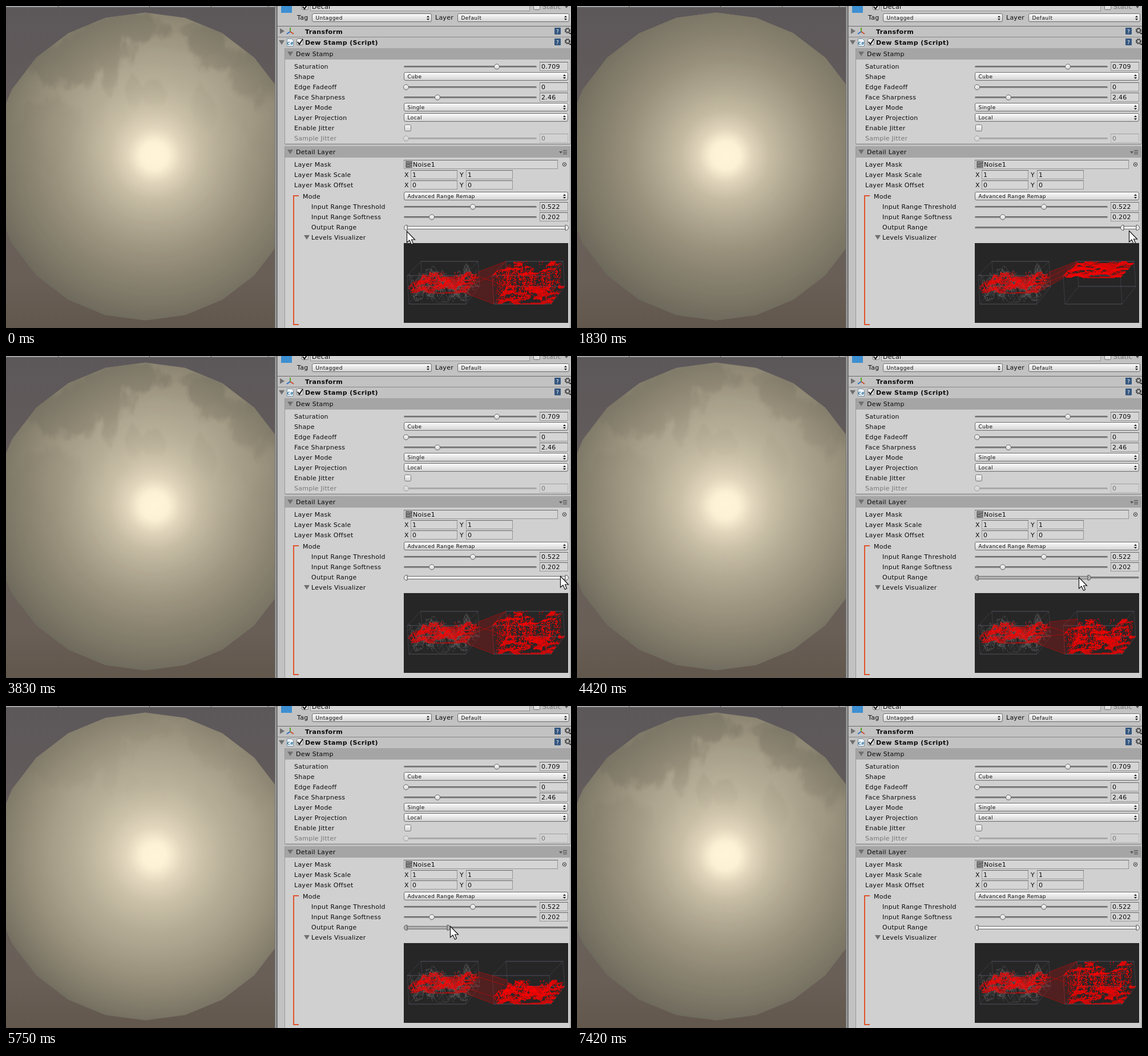
Animation, 990 px wide and 565 px high, one loop 8580 ms. Source, as an HTML page with a canvas:

```html
<!DOCTYPE html>
<html lang="en">
<head>
<meta charset="utf-8">
<title>Output range</title>
<style>
html, body { margin: 0; width: 990px; height: 565px; overflow: hidden; background: #c2c2c2; }
canvas, svg { position: absolute; left: 0; top: 0; display: block; }
text { font: 11px "DejaVu Sans", sans-serif; letter-spacing: .25px; fill: #0a0a0a; white-space: pre; }
.bold { font-weight: bold; letter-spacing: .38px; }
.small { font-size: 9px; letter-spacing: .42px; }
.help { fill: #fff; }
.dim { opacity: .45; }
</style>
</head>
<body>
<canvas id="scene" width="990" height="565"></canvas>
<svg id="ui" width="990" height="565" viewBox="0 0 990 565"></svg>
<script>
const LOOP = 8580, STEP = 1000 / 12;
const clamp = (v, a = 0, b = 1) => Math.min(b, Math.max(a, v));
const mix = (a, b, k) => a + (b - a) * k;
const smooth = (a, b, v) => { const k = clamp((v - a) / (b - a)); return k * k * (3 - 2 * k); };

// ---------- seeded noise ----------
function hash(x, y) {
  let n = Math.imul(x, 374761393) + Math.imul(y, 668265263) | 0;
  n = Math.imul(n ^ (n >>> 13), 1274126177);
  return ((n ^ (n >>> 16)) >>> 0) / 2 ** 32;
}
function valueNoise(x, y) {
  const i = Math.floor(x), j = Math.floor(y);
  const u = smooth(0, 1, x - i), v = smooth(0, 1, y - j);
  return mix(mix(hash(i, j), hash(i + 1, j), u), mix(hash(i, j + 1), hash(i + 1, j + 1), u), v);
}
function fbm(x, y, octaves) {
  let sum = 0, amp = 1, total = 0;
  for (let o = 0; o < octaves; o++, amp /= 2, x = x * 2 + 17, y = y * 2 + 31) {
    sum += amp * valueNoise(x, y);
    total += amp;
  }
  return sum / total;
}

// ---------- inspector ----------
const rect = (x, y, w, h, fill, more = '') => `<rect x="${x}" y="${y}" width="${w}" height="${h}" fill="${fill}" ${more}/>`;
const text = (x, y, s, cls = '') => `<text x="${x}" y="${y}" class="${cls}">${s}</text>`;
const path = (d, fill, more = '') => `<path d="${d}" fill="${fill}" ${more}/>`;
const foldDown = (x, y) => path(`M${x - 5} ${y - 4}h10l-5 8z`, '#707070');

const field = (x, y, w, s = '', h = 15) =>
  rect(x + .5, y - 7.5, w - 1, h, '#d5d5d5', 'stroke="#959595"') +
  rect(x, y - 8, w, 1, '#666') + text(x + 3, y + 4, s);

const popup = (x, y, w, s) =>
  rect(x + .5, y - 7.5, w - 1, 14, 'url(#button)', 'rx="2.5" stroke="#6c6c6c"') +
  text(x + 6.5, y + 3, s, 'small') +
  path(`M${x + w - 9} ${y - 1}h5l-2.5 -3zM${x + w - 9} ${y + 1}h5l-2.5 3z`, '#222');

const slider = (y, knob, value) =>
  rect(697, y - 1, 233, 3, '#8b8b8b', 'rx="1.5"') + rect(698, y - 1, 231, 1, '#555') +
  `<circle cx="${knob}" cy="${y + .5}" r="4.5" fill="url(#button)" stroke="#606060"/>` +
  field(935, y, 50, value);

const checkbox = (x, y) => rect(x + .5, y + .5, 11, 11, 'url(#button)', 'rx="2" stroke="#777"');
const tick = (x, y) => path(`M${x + 2} ${y + 5}l3 4 6 -9`, 'none', 'stroke="#111" stroke-width="2"');

const headerIcons = y =>
  rect(961, y - 6, 11, 12, '#35577f', 'rx="1"') + text(964, y + 3.5, '?', 'small help') +
  `<circle cx="984" cy="${y - 1}" r="3.6" fill="none" stroke="#3c3c3c" stroke-width="3" stroke-dasharray="2 .8"/>` +
  path(`M986 ${y + 3}h5l-2.5 3z`, '#333');

const section = (y, bottom, title) =>
  rect(489, y, 499, bottom - y, '#d0d0d0') + rect(489, y, 499, 20, '#a5a5a5') +
  path(`M488.5 ${y}V${bottom}H988.5V${y}`, 'none', 'stroke="#989898"') +
  foldDown(498, y + 10) + text(508, y + 14, title);

const vector = (y, value) => [[698, 'X'], [795, 'Y']]
  .map(([x, axis]) => text(x, y + 4, axis) + field(x + 11, y, 82, value)).join('');

const labels = [[505, 106, 'Saturation'], [505, 124, 'Shape'], [505, 142, 'Edge Fadeoff'],
  [505, 160, 'Face Sharpness'], [505, 178, 'Layer Mode'], [505, 196, 'Layer Projection'],
  [505, 214, 'Enable Jitter'], [505, 278, 'Layer Mask'], [505, 296, 'Layer Mask Scale'],
  [505, 314, 'Layer Mask Offset'], [520, 334, 'Mode'], [535, 352, 'Input Range Threshold'],
  [535, 370, 'Input Range Softness'], [535, 388, 'Output Range'], [535, 406, 'Levels Visualizer']];

const ui = document.getElementById('ui');
ui.innerHTML = `
<defs>
  <linearGradient id="button" x2="0" y2="1"><stop stop-color="#fcfcfc"/><stop offset="1" stop-color="#d2d2d2"/></linearGradient>
  <clipPath id="frame"><path clip-rule="evenodd" d="M471 0H990V565H471ZM697 416H985V556H697Z"/></clipPath>
</defs>
<g clip-path="url(#frame)">
  ${rect(471, 0, 519, 565, '#c2c2c2')}${rect(471, 0, 4, 565, '#a2a2a2')}${rect(471, 0, 1, 565, '#777')}${rect(474, 0, 1.5, 565, '#555')}
  ${section(74, 242, 'Dew Stamp')}${rect(489, 242, 500, 1, '#888')}
  ${section(246, 566, 'Detail Layer')}
</g>
${rect(482, 0, 19, 12, '#3d8fd1')}
${checkbox(518, -5)}${tick(518, -4)}
${field(533, 1, 385, 'Decal')}
${checkbox(924, -5)}${text(940, 5, 'Static', 'dim')}${path('M979 0h6l-3 4z', '#555')}
${text(510, 24, 'Tag')}${popup(536, 21, 210, 'Untagged')}
${text(752, 24, 'Layer')}${popup(791, 21, 196, 'Default')}
${rect(475, 35, 515, 1, '#6a6a6a')}${rect(475, 54, 515, 1, '#888')}
${path('M480 39v10l8 -5z', '#707070')}
${path('M498 38v7', 'none', 'stroke="#59a526" stroke-width="2"')}
${path('M498 45l-6 4', 'none', 'stroke="#2c70c9" stroke-width="2"')}
${path('M498 45l6 4', 'none', 'stroke="#d14a2c" stroke-width="2"')}
${text(524, 49, 'Transform', 'bold')}${headerIcons(44)}
${foldDown(483, 64)}
${path('M492.5 57.5h8l3 3v10h-11z', '#eef3f7', 'stroke="#78909f"')}
<text x="492.5" y="67.5" style="font-size:7px;font-weight:bold;letter-spacing:0;fill:#246f9d">C#</text>
${checkbox(509, 57)}${tick(509, 58)}
${text(524, 68, 'Dew Stamp (Script)', 'bold')}${headerIcons(63)}
${labels.map(([x, y, s]) => text(x, y + 4, s)).join('')}
${slider(106, 860, '0.709')}${popup(697, 124, 288, 'Cube')}
${slider(142, 701, '0')}${slider(160, 756, '2.46')}
${popup(697, 178, 288, 'Single')}${popup(697, 196, 288, 'Local')}
${checkbox(698, 208)}
<g class="dim">${text(505, 236, 'Sample Jitter')}${slider(232, 701, '0')}</g>
${path('M969 255h6l-3 4z', '#555')}${path('M976 253.5h7m-7 3h7m-7 3h7', 'none', 'stroke="#444"')}
${field(697, 278, 270)}${rect(700, 272, 12, 12, '#6c6c6c')}
${path('M701 275h5m2 3h4m-10 2h6m-2 -6h4m-2 8h4', 'none', 'stroke="#939393" stroke-width="1.5"')}
${text(713, 282, 'Noise1')}
<circle cx="978.5" cy="278" r="3.2" fill="none" stroke="#333"/><circle cx="978.5" cy="278" r="1" fill="#222"/>
${vector(296, '1')}${vector(314, '0')}
${path('M513 333H504V559H513', 'none', 'stroke="#e0532b" stroke-width="2"')}
${popup(697, 334, 288, 'Advanced Range Remap')}
${slider(352, 818, '0.522')}${slider(370, 746, '0.202')}
${rect(697, 387.5, 288, 3, '#8b8b8b', 'rx="1.5"')}${rect(698, 387.5, 286, 1, '#555')}
${foldDown(527, 406)}
<rect id="bar" y="386.5" height="5" stroke="#6a6a6a"/>
<path id="low" d="M6 384.5H5a4.5 4.5 0 0 0 0 9h1z" stroke="#555"/>
<path id="high" d="M-6 384.5h1a4.5 4.5 0 0 1 0 9h-1z" stroke="#555"/>
<path id="cursor" d="M.5 .5V20L5 16L8.5 23.5L11.5 22L8.5 15H14.5Z" fill="#fff" stroke="#111" stroke-width="1.2"/>`;

const [bar, low, high, cursor] = ['bar', 'low', 'high', 'cursor'].map(id => document.getElementById(id));

// ---------- sphere ----------
const VIEW_W = 471, VIEW_H = 565;
const scene = document.getElementById('scene');
const ctx = scene.getContext('2d');

function layer(draw) {
  const c = document.createElement('canvas');
  c.width = VIEW_W; c.height = VIEW_H;
  draw(c.getContext('2d'));
  return c;
}
function sphere(g, stops) {
  const fill = g.createRadialGradient(260, 262, 0, 260, 262, 300);
  stops.forEach(([r, color]) => fill.addColorStop(r / 300, color));
  g.fillStyle = fill;
  g.beginPath();
  for (let i = 0; i < 24; i++) {
    const a = i * Math.PI / 12;
    g.lineTo(244 + 270 * Math.sin(a), 281.5 - 270 * Math.cos(a));
  }
  g.fill();
}
const dry = layer(g => {
  const back = g.createLinearGradient(0, 0, 0, VIEW_H);
  [[0, '#5c585a'], [.15, '#5f595a'], [.5, '#6a625e'], [.85, '#695f57'], [1, '#62574c']].forEach(s => back.addColorStop(...s));
  g.fillStyle = back;
  g.fillRect(0, 0, VIEW_W, VIEW_H);
  g.fillStyle = '#c4c4c4';
  g.fillRect(0, 0, VIEW_W, 1.5);
  g.fillStyle = '#77757a';
  g.fillRect(0, 1.5, VIEW_W, 1);
  g.fillStyle = '#4c494a';
  [91, 251, 359, 459].forEach(x => g.fillRect(x, 0, 1, 2));
  sphere(g, [[0, '#fff4d8'], [20, '#fdf2d6'], [50, '#e2d7bd'], [85, '#cdc3ab'], [130, '#bab19a'],
    [180, '#aaa28c'], [225, '#98907b'], [270, '#827c6b'], [300, '#716d5f']]);
});
const wet = layer(g => sphere(g, [[0, '#fff4d8'], [25, '#fcf1d5'], [48, '#dfd4ba'], [78, '#c5bba3'],
  [120, '#afa690'], [170, '#98907b'], [215, '#88816f'], [260, '#797464'], [300, '#6b675a']]));

// Stains: centre x, centre y, radius x, radius y, strength
const stains = [[150, 78, 72, 42, 1], [215, 36, 62, 26, 1], [130, 108, 30, 40, 1], [182, 112, 18, 42, .85],
  [70, 92, 52, 42, .85], [350, 62, 34, 24, 1], [385, 92, 46, 26, .9], [425, 122, 44, 46, .8],
  [330, 42, 28, 14, .7], [262, 152, 22, 20, .5], [220, 150, 16, 26, .5], [75, 225, 60, 55, .4], [345, 180, 22, 40, .4]];
const stained = layer(g => {
  const img = g.createImageData(VIEW_W, VIEW_H);
  for (let y = 0; y < VIEW_H; y++) for (let x = 0; x < VIEW_W; x++) {
    const fray = (fbm(x / 26, y / 48, 5) - .5) * 1.4;
    let open = 1 - mix(.1, .84, smooth(110, 310, y + fray * 40));
    for (const [cx, cy, rx, ry, s] of stains) {
      const d = Math.hypot((x - cx) / rx, (y - cy) / ry);
      if (d < 2) open *= 1 - s * smooth(1.25, .7, d + fray);
    }
    img.data[(y * VIEW_W + x) * 4 + 3] = 255 * (1 - open);
  }
  g.putImageData(img, 0, 0);
  g.globalCompositeOperation = 'source-in';
  g.drawImage(wet, 0, 0);
});
function drawView(lo, hi) {
  ctx.globalAlpha = 1;
  ctx.drawImage(dry, 0, 0);
  ctx.globalAlpha = lo;
  ctx.drawImage(wet, 0, 0);
  ctx.globalAlpha = clamp((hi - lo) / (1 - lo + 1e-6));
  ctx.drawImage(stained, 0, 0);
  ctx.globalAlpha = 1;
}

// ---------- levels visualizer ----------
const LEFT = 703, RIGHT = 852, ROWS = 34, COLS = 120;
const IN_LO = .38, IN_HI = .58;
const project = (ox, u, v, h) => [ox + 3 * (1 - h) + 100 * u + 24 * v, 523 - 50 * h - v * (31 - 6 * h)];
const heights = Array.from({ length: ROWS }, (_, r) => Array.from({ length: COLS }, (_, c) =>
  clamp(.48 + (fbm(c / 14 + 3, r / 4 + 9, 5) - .5) * 1.9, .06, .98)));

function outline(points, stroke, fill) {
  ctx.beginPath();
  points.forEach(p => ctx.lineTo(...p));
  ctx.closePath();
  if (fill) { ctx.fillStyle = fill; ctx.fill(); }
  ctx.strokeStyle = stroke;
  ctx.stroke();
}
function wireBox(ox) {
  const face = v => [[0, 0], [1, 0], [1, 1], [0, 1]].map(([u, h]) => project(ox, u, v, h));
  const slab = h => [[0, 0], [1, 0], [1, 1], [0, 1]].map(([u, v]) => project(ox, u, v, h));
  [face(0), face(1), slab(0), slab(1)].forEach(p => outline(p, 'rgba(112,112,140,.38)'));
}
// Gentle steps become lines, steep ones scattered dots.
function surface(ox, map, color, steep) {
  ctx.strokeStyle = ctx.fillStyle = color;
  ctx.beginPath();
  heights.forEach((row, r) => {
    let px, py;
    row.forEach((h, c) => {
      const [x, y] = project(ox, c / (COLS - 1), r / (ROWS - 1), map(h));
      if (c && Math.abs(y - py) < steep) {
        ctx.moveTo(px, py);
        ctx.lineTo(x, y);
      } else if (c) {
        for (let i = 0; i < 2; i++) {
          const k = hash(c * 2 + i, r);
          ctx.fillRect(Math.round(mix(px, x, k)), Math.round(mix(py, y, k)), 1, 1);
        }
      }
      px = x; py = y;
    });
  });
  ctx.stroke();
}
function drawLevels(lo, hi) {
  ctx.fillStyle = '#262626';
  ctx.fillRect(697, 416, 288, 140);
  ctx.lineWidth = .8;
  wireBox(LEFT);
  wireBox(RIGHT);
  surface(LEFT, h => h, 'rgba(110,110,110,.45)', 2.5);
  const from = (v, h) => project(LEFT, 1, v, h), to = (v, h) => project(RIGHT, 0, v, h);
  const link = (v1, a1, b1, v2, a2, b2) =>
    outline([from(v1, a1), to(v1, b1), to(v2, b2), from(v2, a2)], 'rgba(255,0,0,.3)', 'rgba(255,0,0,.1)');
  link(0, IN_LO, lo, 1, IN_LO, lo);
  link(0, IN_HI, hi, 1, IN_HI, hi);
  link(0, IN_LO, lo, 0, IN_HI, hi);
  link(1, IN_LO, lo, 1, IN_HI, hi);
  surface(LEFT, h => clamp(h, IN_LO, IN_HI), 'rgba(255,0,0,.75)', 2);
  ctx.lineWidth = 1;
  surface(RIGHT, h => mix(lo, hi, clamp((h - IN_LO) / (IN_HI - IN_LO))), '#f00', 2);
}

// ---------- motion ----------
const lowKeys = [[670, 0], [920, .117], [1500, .56], [1830, .92], [2000, .955], [2170, .955], [3000, .06], [3250, 0]];
const highKeys = [[4080, 1], [4170, .97], [4920, .13], [5080, .015], [5250, .015], [6170, .45], [6420, .71], [7000, 1]];
const cursorKeys = [[0, 702, 395], [330, 698, 389], [580, 698, 389], [920, 737, 390], [1500, 866, 392], [1830, 967, 394],
  [2000, 975, 393], [2080, 975, 393], [3000, 706, 392], [3250, 674, 392], [3330, 674, 392], [3420, 678, 399],
  [3580, 790, 398], [3830, 971, 386], [4000, 976, 388], [4080, 976, 388], [4920, 733, 388], [5080, 706, 388],
  [5250, 706, 388], [6170, 838, 385], [6420, 914, 381], [7000, 978, 381], [7085, 978, 381], [7330, 988, 466]];
const dragging = [[670, 1580], [2170, 3250], [4170, 7160]];

function at(keys, t, n = 1) {
  if (t <= keys[0][0]) return keys[0][n];
  for (let i = 1; i < keys.length; i++) {
    const a = keys[i - 1], b = keys[i];
    if (t < b[0]) return mix(a[n], b[n], (t - a[0]) / (b[0] - a[0]));
  }
  return keys[keys.length - 1][n];
}

function render(t) {
  const lo = at(lowKeys, t), hi = at(highKeys, t);
  drawView(lo, hi);
  drawLevels(lo, hi);
  const x1 = Math.round(697 + 277 * lo), x2 = Math.round(709 + 277 * hi);
  const fill = dragging.some(([a, b]) => t >= a - 5 && t < b) ? '#b0b0b0' : '#eee';
  bar.setAttribute('x', x1 + 6);
  bar.setAttribute('width', Math.max(0, x2 - x1 - 12));
  low.setAttribute('transform', `translate(${x1} 0)`);
  high.setAttribute('transform', `translate(${x2} 0)`);
  [bar, low, high].forEach(el => el.setAttribute('fill', fill));
  cursor.setAttribute('transform', `translate(${Math.round(at(cursorKeys, t, 1))} ${Math.round(at(cursorKeys, t, 2))})`);
  cursor.setAttribute('visibility', t < 7400 ? 'visible' : 'hidden');
}

const start = performance.now();
let shown = -1;
function animate() {
  const step = Math.floor(((performance.now() - start) % LOOP + 4) / STEP);
  if (step !== shown) render((shown = step) * STEP);
  requestAnimationFrame(animate);
}
animate();
</script>
</body>
</html>
```
